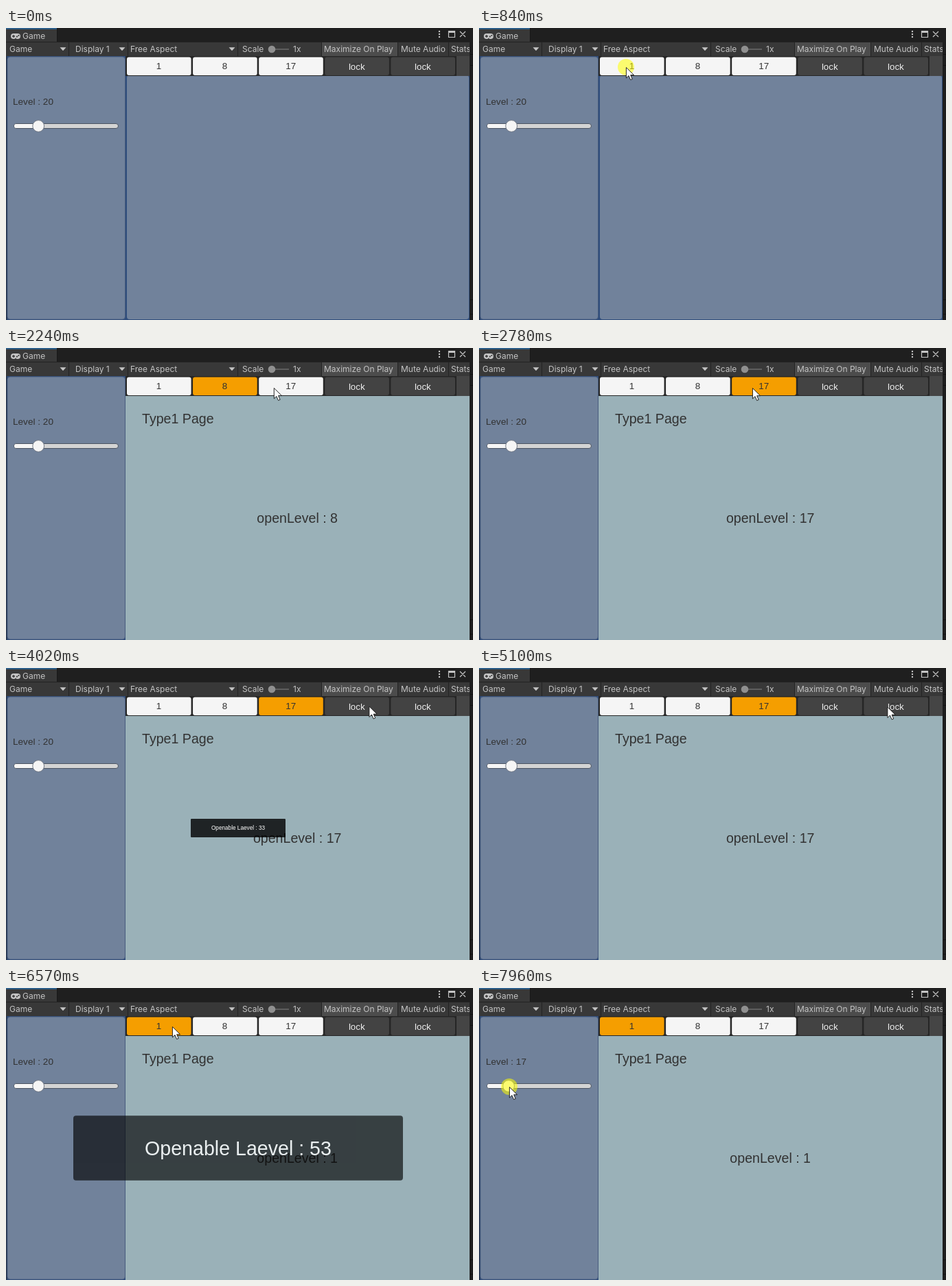
Write an HTML page that moves like this. It is 680 px wide and 426 px high and loops after 8000 ms.

```html
<!DOCTYPE html>
<html lang="en">
<head>
<meta charset="utf-8">
<title>Game view</title>
<style>
  html, body { margin: 0; width: 100%; height: 100%; overflow: hidden; background: #1e1e1e; }
  svg { display: block; width: 100%; height: 100%; }
  .ui { font: 12px Inter, sans-serif; fill: #c4c4c4; }
  .game { font-family: "Liberation Sans", Arial, sans-serif; fill: #323232; }
  .mid { text-anchor: middle; }
</style>
</head>
<body>
<svg viewBox="0 0 680 426" preserveAspectRatio="none">
  <rect width="680" height="426" fill="#1f1f1f"/>

  <!-- window title -->
  <rect width="74" height="20" fill="#383838"/>
  <rect width="74" height="2" fill="#2c5d87"/>
  <rect x="74" width="1" height="20" fill="#181818"/>
  <rect x="7" y="8" width="14" height="8" rx="4" fill="#c4c4c4"/>
  <path d="M9 12h4M11 10v4" stroke="#383838" stroke-width="1.3"/>
  <circle cx="16" cy="12.6" r="1.1" fill="#383838"/>
  <circle cx="18.4" cy="11" r="1.1" fill="#383838"/>
  <path d="M12.5 16h3l-1.5-1.5z" fill="#383838"/>
  <text class="ui" x="24" y="16">Game</text>
  <g fill="#c4c4c4">
    <circle cx="631" cy="5" r="1.2"/><circle cx="631" cy="9" r="1.2"/><circle cx="631" cy="13" r="1.2"/>
    <rect x="644" y="4" width="10" height="3"/>
  </g>
  <path d="M644.5 4.5h9v9h-9zM661 5l8 8M669 5l-8 8" fill="none" stroke="#c4c4c4" stroke-width="1.2"/>

  <!-- toolbar -->
  <rect y="20" width="675" height="21" fill="#383838"/>
  <rect x="460" y="20" width="110" height="21" fill="#4c4c4c"/>
  <path d="M91.5 20v21M177.5 20v21M337.5 20v21M459.5 20v21M570.5 20v21M644.5 20v21M0 20.5H675" stroke="#232323"/>
  <path id="arrows" fill="#c4c4c4"/>
  <path d="M387 31h25" stroke="#5e5e5e" stroke-width="2"/>
  <circle cx="387" cy="31" r="5.3" fill="#8f8f8f"/>
  <g class="ui" id="tools"></g>

  <!-- game view -->
  <rect y="41" width="675" height="385" fill="#2f4d7c"/>
  <rect y="41" width="1.5" height="385" fill="#27344a"/>
  <rect x="2" y="42" width="171.5" height="383" rx="4" fill="#71829b" stroke="#465a7c" stroke-width=".8"/>
  <rect x="176" y="69" width="498" height="356" rx="4" fill="#71829b"/>
  <rect x="174" y="41" width="501" height="29" fill="#262626"/>
  <rect x="656" y="41" width="19" height="29" fill="#454545"/>
  <g id="tabs" class="game mid" font-size="13.4"></g>

  <text id="level" class="game" x="10" y="112" font-size="13.6"></text>
  <rect x="11.5" y="139.5" width="152" height="7" rx="3.5" fill="#d4d4d4" stroke="#4a5361"/>
  <rect id="fill" x="12" y="140" height="6" rx="3" fill="#f5f5f5"/>
  <circle id="knob" cy="143" r="8.4" fill="#f5f5f5" stroke="#68707c" stroke-width=".9"/>

  <g id="page" class="game" font-size="19.6">
    <rect x="174" y="70" width="501" height="356" fill="#9ab1b8"/>
    <text x="198" y="110">Type1 Page</text>
    <text id="open" class="mid" x="424.2" y="255"></text>
  </g>

  <g id="popup">
    <rect x="-240" y="-47.3" width="480" height="94.6" rx="4" fill="#000" fill-opacity=".8"/>
    <text id="note" class="game mid" y="10.3" font-size="28.6" style="fill:#fff"></text>
  </g>

  <!-- strip behind the window -->
  <rect x="675" y="20" width="5" height="406" fill="#1e1e1e"/>
  <path d="M676 38.5h4M676 54.5h4M676 396.5h4M676 417.5h4" stroke="#111"/>

  <circle id="press" r="12" fill="#ff0" fill-opacity=".55"/>
  <path id="cursor" d="M.4 .6V16L4 12.6 6.6 18.6 9.2 17.5 6.7 11.7H11.6Z" fill="#fff" stroke="#111" stroke-width=".9"/>
</svg>
<script>
const LOOP = 8000;
const $ = id => document.getElementById(id);
const set = (el, attrs) => { for (const k in attrs) el.setAttribute(k, attrs[k]); };
const show = (el, on) => set(el, { visibility: on ? 'visible' : 'hidden' });

function add(parent, tag, attrs, text = '') {
  const el = document.createElementNS('http://www.w3.org/2000/svg', tag);
  set(el, attrs);
  el.textContent = text;
  return parent.appendChild(el);
}

const labels = { 5: 'Game', 101: 'Display 1', 181: 'Free Aspect', 344: 'Scale', 418: '1x',
  463: 'Maximize On Play', 575: 'Mute Audio', 648: 'Stats' };
for (const x in labels) add($('tools'), 'text', { x, y: 35 }, labels[x]);
set($('arrows'), { d: [83, 169, 329].map(x => `M${x - 4.5} 28.3h9l-4.5 5z`).join('') });

const tabs = [1, 8, 17, 33, 53].map((need, i) => {
  const x = 176 + 96.1 * i, locked = need > 20, mid = x + 46.5;
  const box = add($('tabs'), 'rect', { x, y: 42.5, width: 93.6, height: 26.5, rx: 3, fill: locked ? '#434343' : '#f5f5f5' });
  add($('tabs'), 'text', { x: mid, y: 60 }, need);
  if (locked) add($('tabs'), 'text', { x: mid, y: 60.5, style: 'fill:#f0f0f0' }, 'lock');
  return { need, box, locked };
});

// Cursor: start, end, number of steps, target x, target y, upward bow
const moves = [
  [150, 150, 1, 189, 14], [230, 300, 2, 219, 43], [380, 380, 1, 214, 49],
  [610, 610, 1, 214, 57], [1300, 1460, 3, 320, 57], [2010, 2310, 5, 398, 58],
  [2930, 3090, 3, 525, 68], [3240, 3320, 2, 528.5, 55.5], [4480, 4630, 3, 594.5, 56.5],
  [5730, 6200, 7, 242, 56, 7], [7260, 7560, 5, 43, 147], [7640, 7640, 1, 47, 144],
  [7890, 7890, 1, 45, 144], [7960, 7960, 1, 44, 144]
];
const presses = [[840, 920], [1770, 1940], [2710, 2780], [3550, 3700], [4960, 5030], [6420, 6500], [7810, LOOP]];
const pages = [[0, 0], [920, 1], [1940, 8], [2780, 17], [6500, 1]];
const levels = [[0, 20], [7890, 18], [7960, 17]];
const popups = [
  { need: 33, from: 3950, to: 5100, grow: [.02, .2875, 1] },
  { need: 53, from: 5270, to: 7190, grow: [.01, .12, .45, 1], fade: 6500 }
];

const STEP = 76;
const ease = p => p * p * (3 - 2 * p);
const latest = (list, t) => list.filter(([at]) => at <= t).pop()[1];

function cursorAt(t) {
  let x = 189, y = 14;
  for (const [from, to, n, tx, ty, bow = 0] of moves) {
    if (t < from) break;
    const gap = n > 1 ? (to - from) / (n - 1) : 1;
    const k = Math.min(n, Math.floor((t - from) / gap + .02) + 1);
    const p = ease(k / n);
    x += (tx - x) * p;
    y += (ty - y) * p - bow * Math.sin(Math.PI * p);
  }
  return [x, y];
}

function drawPopup(t) {
  const p = popups.find(p => t >= p.from && t < p.to);
  show($('popup'), p);
  if (!p) return;
  const k = Math.min(p.grow.length - 1, Math.floor((t - p.from) / STEP + .1));
  const faded = p.fade && t >= p.fade ? Math.floor((t - p.fade) / STEP + .1) + 1 : 0;
  set($('popup'), {
    transform: `translate(338 233.5) scale(${p.grow[k]})`,
    opacity: Math.max(0, 1 - faded / 10)
  });
  $('note').textContent = `Openable Laevel : ${p.need}`;
}

function draw(t) {
  const page = latest(pages, t), level = latest(levels, t);
  show($('page'), page);
  $('open').textContent = `openLevel : ${page}`;
  for (const { need, box, locked } of tabs)
    if (!locked) set(box, { fill: need === page ? '#f59e00' : '#f5f5f5' });

  const kx = 20 + 1.36 * level;
  $('level').textContent = `Level : ${level}`;
  set($('knob'), { cx: kx });
  set($('fill'), { width: kx - 12 });
  drawPopup(t);

  const [x, y] = cursorAt(t);
  show($('cursor'), t >= 150);
  set($('cursor'), { transform: `translate(${x} ${y})` });
  show($('press'), presses.some(([a, b]) => t >= a && t < b));
  set($('press'), { cx: x, cy: y });
}

const start = performance.now();
function tick() {
  draw((performance.now() - start) % LOOP);
  requestAnimationFrame(tick);
}
tick();
</script>
</body>
</html>
```
